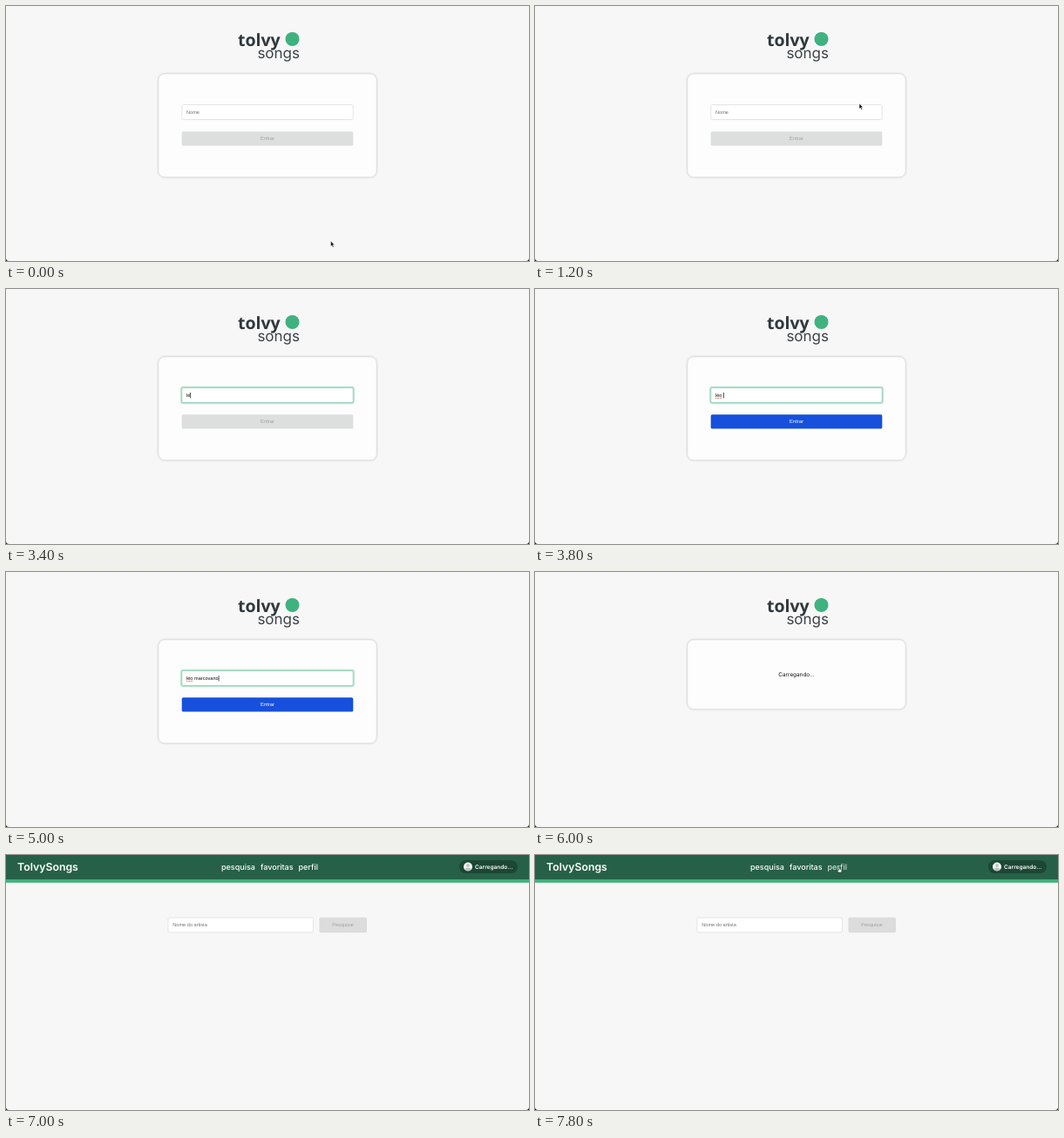
Recreate the animation shown at these times as an HTML page. Size 600 px wide and 293 px high, loop 8000 ms.

```html
<!DOCTYPE html>
<html lang="pt-BR">
<head>
<meta charset="utf-8">
<title>TolvySongs</title>
<style>
html, body { margin: 0; width: 100%; height: 100%; overflow: hidden; background: #111; }
svg { display: block; width: 100vw; height: 100vh; }
text { font-family: Inter, "Open Sans", sans-serif; text-rendering: geometricPrecision; white-space: pre; }
.form { font: 5.6px "Liberation Sans", sans-serif; }
.hint { fill: #6f7573; }
.mid { text-anchor: middle; }
.off { fill: #a0a3a2; }
.field { fill: #fff; stroke: #dcdfde; stroke-width: .8; }
.card { fill: #fdfdfd; stroke: #e0e2e1; stroke-width: .7; filter: drop-shadow(0 .7px .8px #0003); }
.nav { font-size: 9px; font-weight: 500; fill: #fff; }
</style>
</head>
<body>
<svg viewBox="0 0 600 293" preserveAspectRatio="none">
  <path fill="#f7f7f7" d="M0 0H600V289.5Q600 293 596.5 293H3.5Q0 293 0 289.5Z"/>

  <g id="login">
    <text x="266" y="45.5" font-size="19.5" font-weight="700" fill="#30383d" style="font-family:'Open Sans',sans-serif">tolvy</text>
    <text x="337" y="60" font-size="17" font-weight="400" fill="#3c4449" text-anchor="end">songs</text>
    <circle cx="328.5" cy="38" r="8" fill="#3fb27f"/>

    <g id="entry">
      <rect class="card" x="175" y="78" width="250" height="118.5" rx="7"/>
      <rect id="ring" x="201.3" y="113" width="197.4" height="18" rx="2.2" fill="none" stroke="#b5e3d0" stroke-width="2.4"/>
      <rect id="name" class="field" x="201.8" y="113.5" width="196.4" height="17" rx="1.8"/>
      <text id="hint" class="form hint" x="207" y="124">Nome</text>
      <text id="typed" class="form" x="207" y="124" fill="#111"></text>
      <path id="spell" d="M207.2 125.4h7.4" stroke="#e5443c" stroke-width=".9" stroke-dasharray=".9 .6"/>
      <rect id="caret" y="119" width=".7" height="6.4" fill="#111"/>
      <rect id="enter" x="201.7" y="144.2" width="196.6" height="16.4" rx="1.6"/>
      <text id="enterText" class="form mid" x="300" y="154.4" style="font-size:5.8px">Entrar</text>
    </g>

    <g id="loading">
      <rect class="card" x="175" y="78" width="250" height="79.5" rx="7"/>
      <text class="mid" x="300" y="120.2" font-size="6.4" fill="#111">Carregando...</text>
    </g>
  </g>

  <g id="search">
    <rect width="600" height="29" fill="#266048"/>
    <rect id="strip" width="600" height="3.8" fill="#41b27d"/>
    <text x="13" y="18" font-size="12.3" font-weight="600" fill="#fff">TolvySongs</text>
    <text class="nav" x="247" y="16.8">pesquisa</text>
    <text class="nav" x="292" y="16.8">favoritas</text>
    <text id="profile" class="nav" x="335.5" y="16.8">perfil</text>
    <g id="user">
      <rect x="520" y="5.6" width="67" height="15" rx="7.5" fill="#1b4734"/>
      <text x="538" y="15.4" font-size="6.5" font-weight="600" fill="#fff">Carregando...</text>
      <g id="avatar">
        <circle cx="530" cy="13" r="5" fill="#f3f5f4"/>
        <circle cx="530" cy="11.6" r="1.8" fill="#b9c0bd"/>
        <path d="M526.5 16.2Q527 13.9 530 13.9T533.5 16.2Q530 18.7 526.5 16.2Z" fill="#b9c0bd"/>
      </g>
    </g>
    <g id="finder">
      <rect class="field" x="186" y="71.3" width="166.4" height="16.8" rx="1.4"/>
      <text class="form hint" x="191.3" y="81.6">Nome do artista</text>
      <rect x="359.5" y="71" width="54.5" height="17.4" rx="1.6" fill="#dcdcdc"/>
      <text class="form mid off" x="386.7" y="81.6">Pesquisar</text>
    </g>
  </g>

  <g id="pointer">
    <path id="arrow" d="M0 0V6.3L1.4 5 2.4 7.2 3.5 6.7 2.5 4.6H4.4Z" fill="#111" stroke="#fff" stroke-width=".5"/>
    <path id="beam" d="M-1.6-3.5Q0-3.5 0-2.6Q0-3.5 1.6-3.5M0-2.6V2.6M-1.6 3.5Q0 3.5 0 2.6Q0 3.5 1.6 3.5" fill="none" stroke="#222" stroke-width=".9"/>
    <path id="hand" d="M-.7 0Q0-.9.7 0V2.2L2.6 2.7Q3.2 2.9 3 3.7L2.4 6H-.9L-2.4 3.6Q-2.2 2.8-.7 3.8Z" fill="#fff" stroke="#222" stroke-width=".5"/>
  </g>
</svg>
<script>
const LOOP = 8000, STEP = 200;
const NAME = 'léo marcovano';
// letters typed at each step, from 3200 ms on
const COUNTS = [1, 2, 3, 4, 6, 7, 9, 11, 12, 13];
const MOVE_IN = [[384, 206], [372, 112], [334, 41], [310, 44], [326, 92], [347.5, 124.3]];
const MOVE_UP = [[346, 98], [347, 58], [349, 19], [349, 14]];

const $ = id => document.getElementById(id);
const show = (id, on) => { $(id).style.display = on ? '' : 'none'; };
const set = (id, key, value) => $(id).setAttribute(key, value);
const at = (list, t, start) => list[Math.min(list.length - 1, Math.floor((t - start) / STEP))];

function drawEntry(t) {
  const count = t < 3200 ? 0 : at(COUNTS, t, 3200);
  const ready = count >= 3;
  const focus = t >= 2400;
  show('ring', focus);
  set('name', 'style', focus ? 'stroke:#8fcdb2' : '');
  show('hint', !count);
  $('typed').textContent = NAME.slice(0, count);
  show('spell', count > 3);
  show('caret', focus && !(t >= 2800 && t < 3200));
  set('caret', 'x', 207 + (count ? $('typed').getComputedTextLength() : 0));
  set('enter', 'fill', ready ? '#1650dc' : '#dcdfde');
  set('enterText', 'fill', ready ? '#fff' : '#a0a3a2');
}

function drawSearch(t) {
  const loaded = t >= 7000;
  show('avatar', loaded);
  set('strip', 'y', loaded ? 28 : 27.2);
  set('user', 'transform', `translate(0 ${loaded ? .5 : 0})`);
  set('finder', 'transform', `translate(0 ${loaded ? .8 : 0})`);
  set('profile', 'opacity', t >= 7600 ? .8 : 1);
}

function drawPointer(t) {
  const visible = t < 3200 || t >= 7200;
  show('pointer', visible);
  if (!visible) return;
  const [x, y] = t < 1000 ? [372.5, 270]
    : t < 3200 ? at(MOVE_IN, t, 1000) : at(MOVE_UP, t, 7200);
  const kind = t >= 7600 ? 'hand' : t >= 2000 && t < 3200 ? 'beam' : 'arrow';
  for (const id of ['arrow', 'beam', 'hand']) show(id, id === kind);
  set('pointer', 'transform', `translate(${x} ${y})`);
}

function draw(t) {
  show('login', t < 6800);
  show('entry', t < 5200);
  show('loading', t >= 5200);
  show('search', t >= 6800);
  if (t < 5200) drawEntry(t);
  if (t >= 6800) drawSearch(t);
  drawPointer(t);
}

const start = performance.now();
function tick(now) {
  draw(Math.max(0, now - start) % LOOP);
  requestAnimationFrame(tick);
}
draw(0);
requestAnimationFrame(tick);
</script>
</body>
</html>
```
